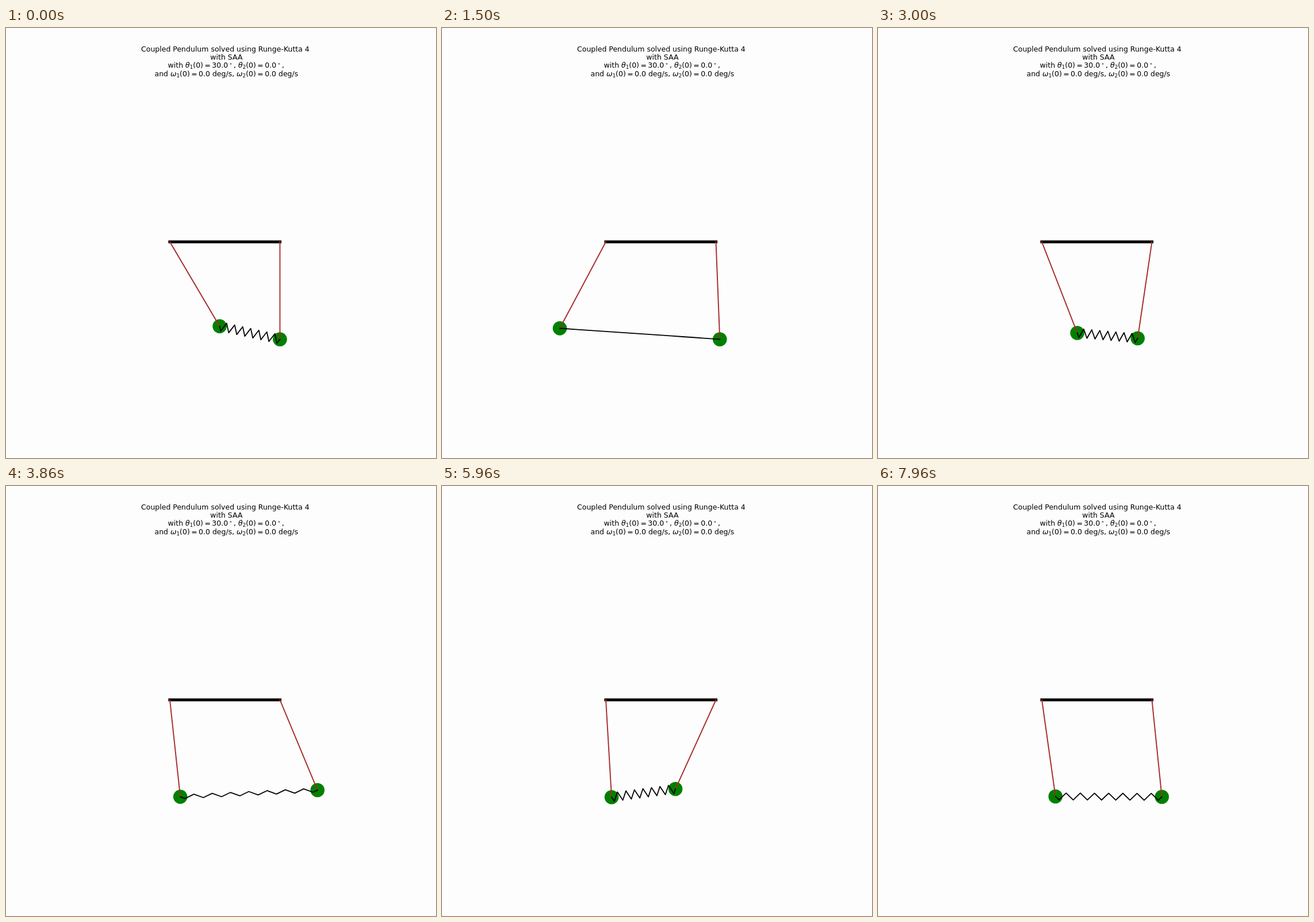
These frames come from a looping animation (748 by 748 pixels, 8000 ms). An HTML page with a canvas:

```html
<!DOCTYPE html>
<html lang="en">
<head>
<meta charset="utf-8">
<title>Coupled Pendulum</title>
<style>
  html, body { margin: 0; width: 100%; height: 100%; overflow: hidden; background: #fdfdfd; }
  canvas { display: block; }
</style>
</head>
<body>
<canvas id="stage" width="748" height="748"></canvas>
<script>
const ctx = document.getElementById('stage').getContext('2d');

// Physics (SI units) and the mapping from metres to pixels
const LOOP = 8000, STEP = 0.02, START_ANGLE = Math.PI / 6;
const GRAVITY = 9.81, ROPE = 1.2, COUPLING = 5;
const IN_PHASE = Math.sqrt(GRAVITY / ROPE);
const ANTI_PHASE = Math.sqrt(GRAVITY / ROPE + COUPLING);
const SCALE_X = 144.4, SCALE_Y = 141.3;
const PIVOT_Y = 372, PIVOTS = [285, 476.5], BOB_RADIUS = 12.3;
const COILS = 15, COIL_WIDTH = 0.12;

const FAMILY = '"DejaVu Sans", sans-serif';
const STYLES = {
  text: { font: `12.5px ${FAMILY}`, rise: 0, pad: 0 },
  symbol: { font: `italic 12.5px ${FAMILY}`, rise: 0, pad: 0 },
  sub: { font: `8.75px ${FAMILY}`, rise: -2, pad: 0 },
  degree: { font: `8.75px ${FAMILY}`, rise: 4.3, pad: 2.25 },
  relation: { font: `12.5px ${FAMILY}`, rise: 0, pad: 2.4 }
};

const initial = (symbol, index, value) => [
  [symbol, 'symbol'], [index, 'sub'], ['(0)'], ['=', 'relation'], [value]
];

const TITLE = [
  { x: 383.4, y: 40.8, runs: [['Coupled Pendulum solved using Runge-Kutta 4 ']] },
  { x: 383.4, y: 54.8, runs: [['with SAA']] },
  { x: 382.8, y: 69.2, runs: [
    ['with '], ...initial('θ', '1', '30.0'), ['∘', 'degree'], [', '],
    ...initial('θ', '2', '0.0'), ['∘', 'degree'], [',']] },
  { x: 383.4, y: 83.6, runs: [
    ['and '], ...initial('ω', '1', '0.0'), [' deg/s, '],
    ...initial('ω', '2', '0.0'), [' deg/s']] }
];

function drawLine({ x, y, runs }) {
  const parts = runs.map(([text, kind = 'text']) => {
    const style = STYLES[kind];
    ctx.font = style.font;
    return { text, style, width: ctx.measureText(text).width + 2 * style.pad };
  });
  let left = x - parts.reduce((sum, part) => sum + part.width, 0) / 2;
  for (const { text, style, width } of parts) {
    ctx.font = style.font;
    ctx.fillText(text, left + style.pad, y - style.rise);
    left += width;
  }
}

function stroke(points, color, width, cap) {
  ctx.beginPath();
  points.forEach(([x, y]) => ctx.lineTo(x, y));
  ctx.strokeStyle = color;
  ctx.lineWidth = width;
  ctx.lineCap = cap;
  ctx.lineJoin = 'round';
  ctx.stroke();
}

// Zigzag of fixed wire length: it flattens as the ends move apart
function springPoints(start, end) {
  const dx = (end[0] - start[0]) / SCALE_X, dy = (end[1] - start[1]) / SCALE_Y;
  const length = Math.hypot(dx, dy);
  const height = Math.sqrt(Math.max(0, COIL_WIDTH ** 2 - (length / COILS) ** 2)) / 2;
  const points = [start];
  for (let i = 0; i < COILS; i++) {
    const along = (i + 0.5) / COILS;
    const across = (i % 2 ? -height : height) / length;
    points.push([
      start[0] + (dx * along - dy * across) * SCALE_X,
      start[1] + (dy * along + dx * across) * SCALE_Y
    ]);
  }
  return [...points, end];
}

function draw(ms) {
  // 30 steps per second, on a clock of 10 ms ticks
  const step = Math.ceil(3 * (Math.floor(ms / 10) + 1) / 10) - 1;
  const t = step * STEP;
  const sum = Math.cos(IN_PHASE * t), difference = Math.cos(ANTI_PHASE * t);
  const angles = [sum + difference, sum - difference].map(a => a * START_ANGLE / 2);
  const bobs = angles.map((angle, i) => [
    PIVOTS[i] + ROPE * SCALE_X * Math.sin(angle),
    PIVOT_Y + ROPE * SCALE_Y * Math.cos(angle)
  ]);

  ctx.fillStyle = '#fdfdfd';
  ctx.fillRect(0, 0, 748, 748);
  ctx.fillStyle = '#000';
  TITLE.forEach(drawLine);

  stroke(PIVOTS.map(x => [x, PIVOT_Y]), '#000', 5.2, 'square');
  ctx.fillStyle = '#008000';
  for (const [x, y] of bobs) {
    ctx.beginPath();
    ctx.arc(x, y, BOB_RADIUS, 0, 2 * Math.PI);
    ctx.fill();
  }
  bobs.forEach((bob, i) => stroke([[PIVOTS[i], PIVOT_Y], bob], '#a52a2a', 1.9, 'square'));
  stroke(springPoints(...bobs), '#000', 1.8, 'square');
}

const begin = performance.now();
function tick() {
  draw((performance.now() - begin) % LOOP);
  requestAnimationFrame(tick);
}
tick();
</script>
</body>
</html>
```
